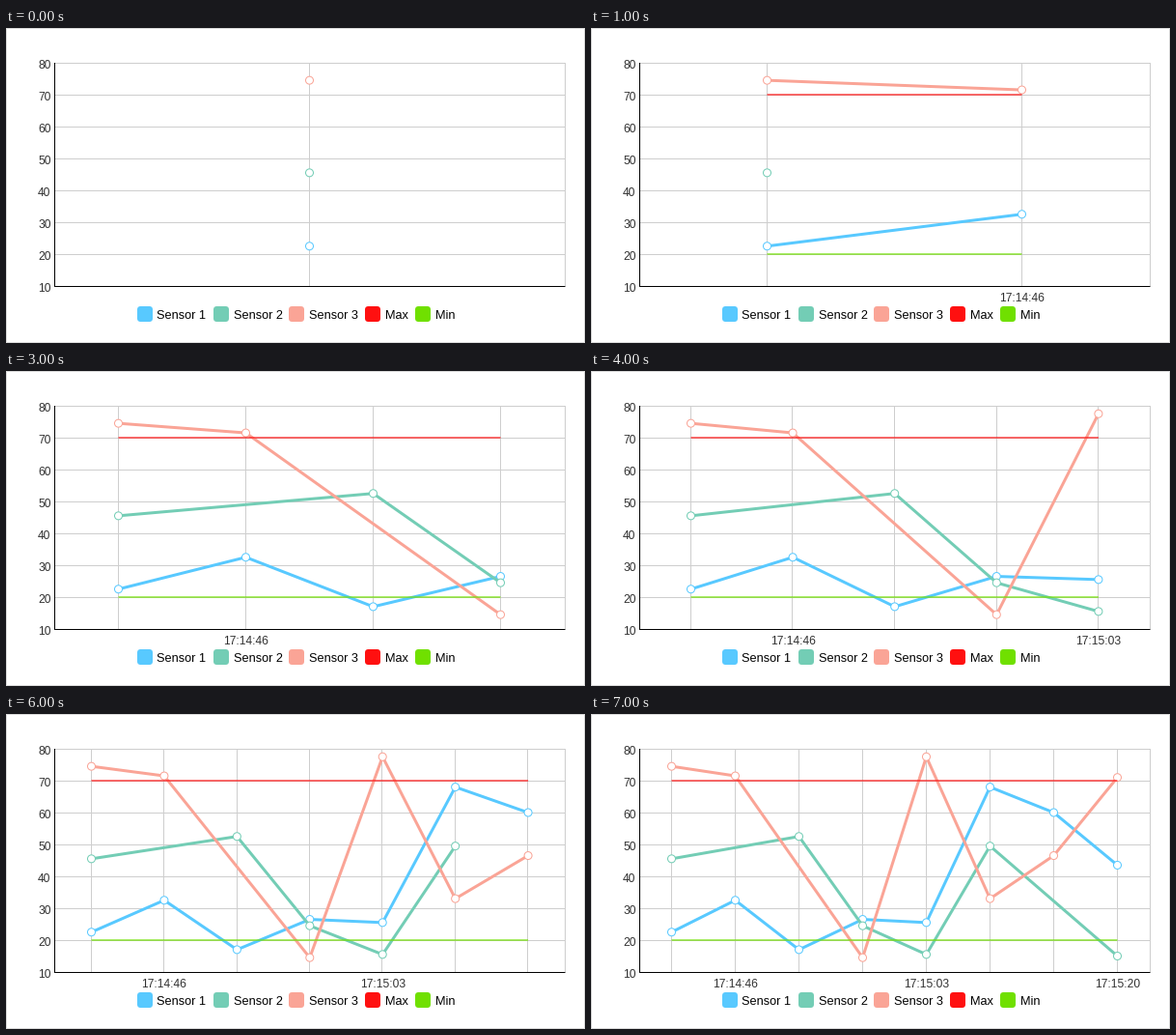
Animation of 600x326 px, one loop 8 s. Source, as a matplotlib script:

```python
import math

import matplotlib.pyplot as plt
from matplotlib.animation import FuncAnimation
from matplotlib.patches import Circle, FancyBboxPatch, Rectangle

W, H, DPI = 600, 326, 100
LEFT, RIGHT, TOP, BOTTOM = 50.5, 579.5, 36.5, 267.5
SPAN = 528
STEPS = 8
PX = 72 / DPI
GRID = "#cecece"

SENSORS = [
    ("Sensor 1", "#58c9ff", [22.5, 32.5, 17, 26.5, 25.5, 68, 60, 43.5]),
    ("Sensor 2", "#73cdb5", [45.5, None, 52.5, 24.5, 15.5, 49.5, None, 15]),
    ("Sensor 3", "#faa496", [74.5, 71.5, None, 14.5, 77.5, 33, 46.5, 71]),
]
LIMITS = [("Max", "#ff1010", 70), ("Min", "#70e000", 20)]
TIMES = {1: "17:14:46", 4: "17:15:03", 7: "17:15:20"}

fig = plt.figure(figsize=(W / DPI, H / DPI), dpi=DPI, facecolor="white")
ax = fig.add_axes([0, 0, 1, 1])
ax.set_xlim(0, W)
ax.set_ylim(H, 0)
ax.axis("off")


def line(xs, ys, color, width=1, z=1, snap=False):
    return ax.plot(xs, ys, color=color, lw=width * PX, zorder=z, snap=snap,
                   solid_capstyle="butt", solid_joinstyle="round")[0]


def label(x, y, text, size, align="left", color="black"):
    return ax.text(x, y, text, fontsize=size * PX, family="Liberation Sans",
                   ha=align, va="baseline", color=color, zorder=9)


def to_y(value):
    return 267 - 3.3 * (value - 10)


def draw_base():
    ax.add_patch(Rectangle((0.5, 0.5), W - 1, H - 1, fill=False,
                           ec="#dcdcdc", lw=PX, snap=False))
    for k in range(8):
        y = BOTTOM - 33 * k
        if k:
            line([LEFT, RIGHT + 0.5], [y, y], GRID)
        label(46.5, y + 5.3, str(10 + 10 * k), 12, "right", "#303030")
    line([RIGHT, RIGHT], [TOP, BOTTOM], GRID)
    line([LEFT, LEFT], [TOP - 0.5, BOTTOM + 0.5], "black", z=2)
    line([LEFT, RIGHT], [BOTTOM, BOTTOM], "black", z=2)

    entries = [s[:2] for s in SENSORS] + [m[:2] for m in LIMITS]
    for x, (name, color) in zip([136, 215, 293, 372, 424], entries):
        ax.add_patch(FancyBboxPatch(
            (x, 288), 16, 16, fc=color, ec="none", snap=False,
            boxstyle="round,pad=0,rounding_size=3.5"))
        label(x + 20.5, 301, name, 12.7)


def draw_step(n):
    """Draw the chart holding its first n + 1 readings."""
    count = n + 1
    cell = SPAN / count
    first = math.floor(LEFT + cell / 2) + 0.5
    xs = [first + i * cell for i in range(count)]
    parts = []

    for i, x in enumerate(xs):
        col = math.floor(LEFT + (i + 0.5) * cell) + 0.5
        parts.append(line([col, col], [TOP, BOTTOM], GRID))
        if i in TIMES:
            parts.append(label(x, 283, TIMES[i], 12, "center", "#303030"))

    for z, (_, color, values) in enumerate(SENSORS, 3):
        points = [(x, to_y(v)) for x, v in zip(xs, values) if v is not None]
        parts.append(line(*zip(*points), color, 3, z))
        for p in points:
            parts.append(ax.add_patch(Circle(
                p, 4, fc="white", ec=color, lw=PX, zorder=z + 0.5)))

    for _, color, value in LIMITS:
        if count > 1:
            y = to_y(value)
            parts.append(line([xs[0], xs[-1]], [y, y], color, 1.2, 7))
    return parts


draw_base()
current = []


def update(n):
    while current:
        current.pop().remove()
    current.extend(draw_step(n))
    return current


anim = FuncAnimation(fig, update, frames=STEPS, interval=1000,
                     repeat=True, repeat_delay=0, blit=False)
plt.show()
```
